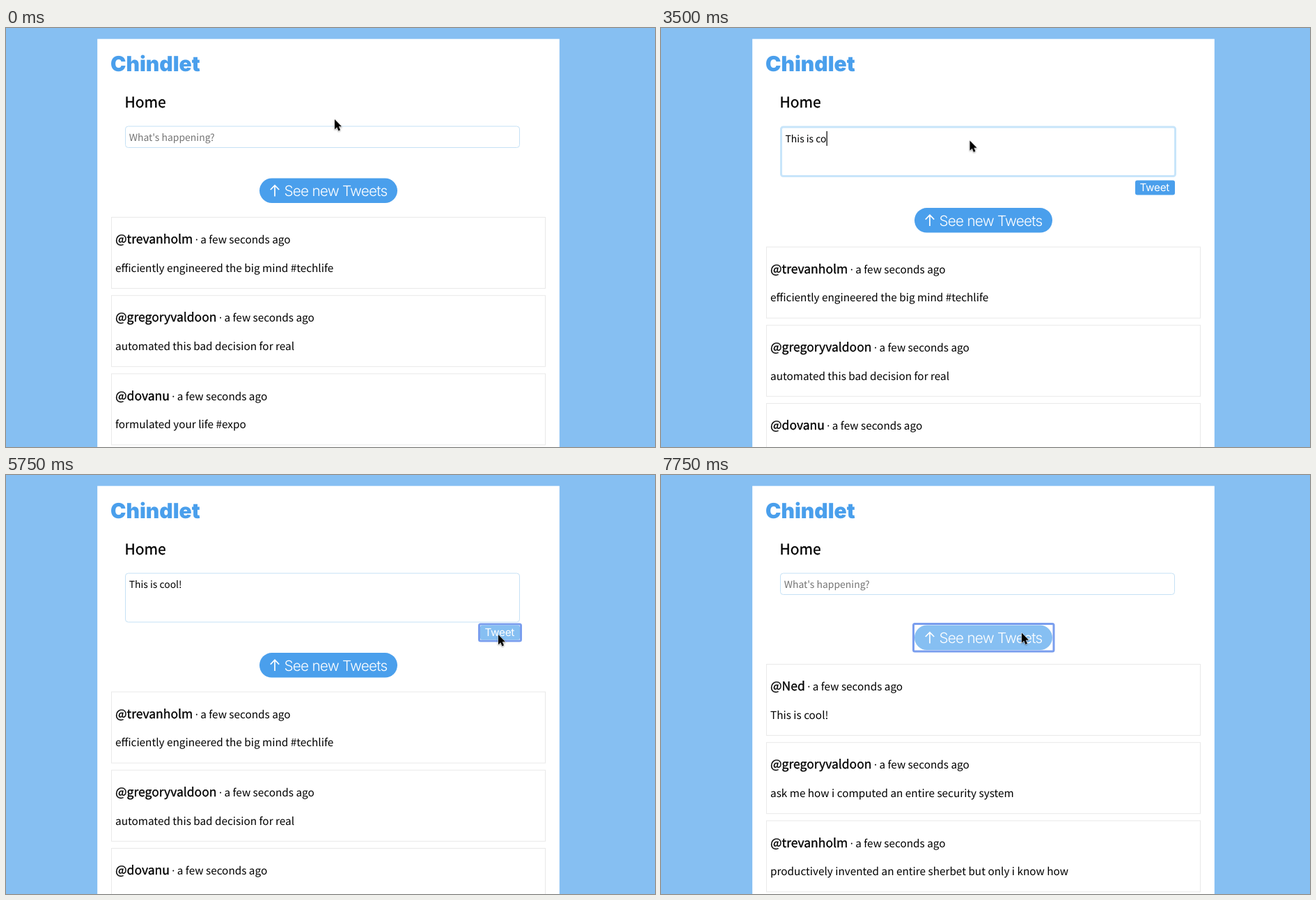
Recreate the animation shown at these times as an HTML page. Size 932 px wide and 601 px high, loop 8 s.

```html
<!DOCTYPE html>
<html lang="en">
<head>
<meta charset="utf-8">
<style>
  html, body { margin: 0; height: 100%; overflow: hidden; background: #86bff2; }
  svg { display: block; width: 932px; height: 601px; }
  text { font: 15.33px "Noto Sans CJK JP", "Noto Sans CJK", sans-serif; white-space: pre; text-rendering: geometricPrecision; }
  .logo { font: 900 30px Inter, sans-serif; fill: #4a9fec; }
  .home, .name { stroke: #000; stroke-width: .35px; }
  .home { font-size: 21px; }
  .name { font-size: 17.5px; }
  .dot { font-family: "Noto Sans", sans-serif; }
  .typed { font-size: 13.95px; }
  .ui { font-family: Inter, sans-serif; fill: #fff; }
  .small { font-size: 15.3px; letter-spacing: -.3px; }
  .large { font-size: 20.8px; font-weight: 350; letter-spacing: -.8px; }
  .ring { fill: #fff; stroke: #7a9eee; stroke-width: 3px; }
  .tweet { fill: none; stroke: #e9e9e9; }
  #cursor { stroke: #fff; paint-order: stroke; filter: drop-shadow(0 1px 1px #0006); }
</style>
</head>
<body>
<svg viewBox="0 0 932 601">
  <rect x="131.2" y="15.7" width="663.6" height="600" fill="#fff"/>
  <text class="logo" x="150" y="61.5">Chindlet</text>
  <text class="home" x="170.5" y="113.5">Home</text>
  <rect id="box" fill="#fff"/>
  <text id="typed" class="typed"></text>
  <path id="caret" stroke="#000" stroke-width="1.2"/>
  <g id="send">
    <rect id="sendRing" class="ring" x="679.5" y="217" width="60" height="24" rx="2"/>
    <rect id="sendFill" x="681" y="218.5" width="57" height="21" rx="3"/>
    <text class="ui small" x="687.5" y="234.3">Tweet</text>
  </g>
  <g id="feed">
    <rect id="moreRing" class="ring" x="362.5" y="213.5" width="201.5" height="39.5" rx="2"/>
    <rect id="moreFill" x="364" y="215.5" width="198" height="35.5" rx="17.75"/>
    <path d="M386 241.5V226M379.8 232L386 225.6L392.2 232" fill="none" stroke="#fff" stroke-width="1.7"/>
    <text class="ui large" x="399.5" y="241.3">See new Tweets</text>
    <g id="before"></g>
    <g id="after"></g>
  </g>
  <path id="cursor" d="M0 0V14.2L3.3 11.3L5.5 16.4L8 15.3L5.8 10.3H10Z"/>
</svg>
<script>
const $ = id => document.getElementById(id);
const set = (id, attrs) => {
  for (const k in attrs) $(id).setAttribute(k, attrs[k]);
};
const show = (id, on) => set(id, { visibility: on ? 'visible' : 'hidden' });
const move = (id, x, y) => set(id, { transform: `translate(${x} ${y})` });
const blue = hover => ({ fill: hover ? '#86bff2' : '#4a9fec' });

const fillFeed = (id, tweets) => {
  $(id).innerHTML = tweets.map(([name, body], i) => `
    <g transform="translate(0 ${i * 112.2})">
      <rect class="tweet" x="151.5" y="271.5" width="623" height="102"/>
      <text x="157" y="309.3"><tspan class="name">@${name}</tspan> <tspan class="dot">·</tspan> a few seconds ago</text>
      <text x="157" y="349.8">${body}</text>
    </g>`).join('');
};
fillFeed('before', [
  ['trevanholm', 'efficiently engineered the big mind #techlife'],
  ['gregoryvaldoon', 'automated this bad decision for real'],
  ['dovanu', 'formulated your life #expo']
]);
fillFeed('after', [
  ['Ned', 'This is cool!'],
  ['gregoryvaldoon', 'ask me how i computed an entire security system'],
  ['trevanholm', 'productively invented an entire sherbet but only i know how']
]);

const LOOP = 8000, TICK = 250;
const FOCUS = 1750, TYPE = 2500, TYPED = 4000, OVER_SEND = 5250, SEND = 5750, POSTED = 6000, OVER_MORE = 7500;
const message = 'This is cool!';

// Mouse stops: [start, x, y]
const stops = [
  [0, 472, 131], [500, 467.5, 151], [750, 464, 157], [1500, 446, 162], [FOCUS, 443.5, 161.5],
  [4500, 458.5, 159], [4750, 682.5, 167.5], [5000, 714.5, 211], [OVER_SEND, 707, 229],
  [7000, 671.5, 223.5], [7250, 567, 213], [OVER_MORE, 518, 226.5]
];

// Typing speeds up, then slows down
function typedCount(t) {
  if (t < TYPE || t >= POSTED) return 0;
  const u = Math.min(1, (t - TYPE + TICK) / (TYPED - TYPE + TICK));
  return Math.floor(message.length * u * u * (3 - 2 * u) + .4);
}

// The blink restarts at every key press
function caretOn(t) {
  const lastKey = t < TYPE ? FOCUS : Math.min(t, TYPED);
  return (t - lastKey) % 1000 < 500;
}

function draw(t) {
  const open = t >= FOCUS && t < POSTED;
  const focus = open && t < SEND;

  set('box', focus
    ? { x: 172.5, y: 142, width: 566, height: 70.5, rx: 3, stroke: '#c8e5fa', 'stroke-width': 3 }
    : { x: 171.5, y: 141, width: 566, height: open ? 70 : 30.5, rx: 4, stroke: '#c5e1f5', 'stroke-width': 1 });

  const text = message.slice(0, typedCount(t));
  const x = focus ? 178.5 : 176.7;
  $('typed').textContent = text || "What's happening?";
  set('typed', { x, y: focus ? 164.2 : 162, fill: text ? '#000' : '#757575' });
  const end = x + .7 + (text ? $('typed').getComputedTextLength() : 0);
  set('caret', { d: `M${end} 148V169` });
  show('caret', focus && caretOn(t));

  move('send', 0, focus ? 0 : -3);
  show('send', open);
  show('sendRing', open && !focus);
  set('sendFill', blue(t >= OVER_SEND));

  move('feed', 0, focus ? 42.6 : open ? 39.6 : 0);
  show('moreRing', t >= OVER_MORE + TICK);
  set('moreFill', blue(t >= OVER_MORE));
  show('before', t < POSTED);
  show('after', t >= POSTED);

  const [, mouseX, mouseY] = stops.findLast(([start]) => start <= t);
  move('cursor', mouseX, mouseY);
}

const start = performance.now();
function frame() {
  const t = (performance.now() - start) % LOOP;
  draw(Math.floor(t / TICK) * TICK);
  requestAnimationFrame(frame);
}
frame();
</script>
</body>
</html>
```
